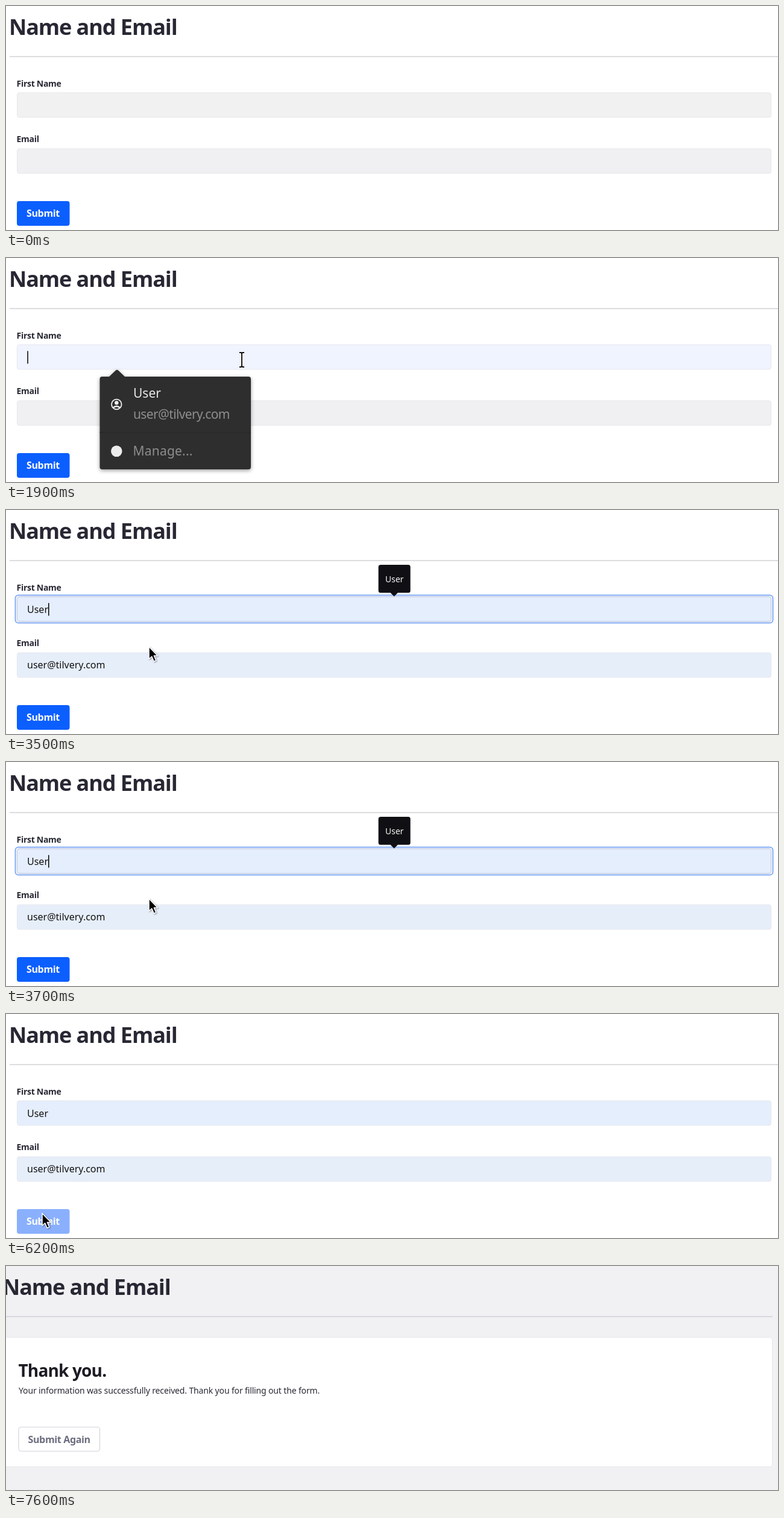
Recreate the animation shown at these times as an HTML page. Size 1280 px wide and 372 px high, loop 8.1 s.

```html
<!DOCTYPE html>
<html lang="en">
<head>
<meta charset="utf-8">
<title>Name and Email</title>
<style>
html, body { margin: 0; width: 100%; height: 100%; overflow: hidden; background: #fff; }
svg { display: block; width: 1280px; height: 372px; }
text { font-family: "Noto Sans", "Open Sans", sans-serif; fill: #272833; }

/* Type */
.title { font-size: 36px; font-weight: 700; letter-spacing: -.03em; }
.label { font-size: 14px; font-weight: 700; letter-spacing: -.02em; }
.button { font-size: 16px; font-weight: 700; letter-spacing: -.022em; }
.thanks { font-size: 28px; font-weight: 700; letter-spacing: -.03em; fill: #1c1c24; }
.info { font-size: 14px; letter-spacing: -.0105em; }
.value text { font-size: 16px; fill: #111; }
.preview text { font: 13.7px "Liberation Sans", Arial, sans-serif; fill: #000; }
.menu text { font-size: 21px; fill: #e8e8e8; }
.menu .dim { fill: #8e8e8e; letter-spacing: -.03em; }
.tip text { font-size: 14px; fill: #f4f4f4; text-anchor: middle; }

/* Shapes */
.field { stroke: #e7e7ed; }
.menu { filter: drop-shadow(0 2px 3px #0006); }
.ring { fill: none; }
.arrow, .hand { fill: #000; stroke: #fff; stroke-width: 1.5; stroke-linejoin: round; filter: drop-shadow(1px 1px 1px #0006); }
.beam { fill: none; }

/* Timeline: every change is a hard cut on one 8.1 s clock */
.name, .mail, .ring, .menu, .hover, .hover-mail, .preview, .value, .tip, .caret-start, .caret-end,
.submit, .done, .pointer, .arrow, .beam, .hand { animation: 8.1s step-end infinite; }
.name { animation-name: name; }
.mail { animation-name: mail; }
.ring { animation-name: ring; }
.menu { animation-name: menu; }
.hover { animation-name: hover; }
.menu .hover-mail { animation-name: hover-mail; }
.preview { animation-name: hover; }
.value { animation-name: value; }
.tip { animation-name: tip; }
.caret-start { animation-name: caret-start; }
.caret-end { animation-name: caret-end; }
.submit { animation-name: submit; }
.done { animation-name: done; }
.pointer { animation-name: move; }
.arrow { animation-name: arrow; }
.beam { animation-name: beam; }
.hand { animation-name: hand; }

@keyframes name { 0% { fill: #f1f1f1; } 18.51% { fill: #f0f4ff; } 30.86% { fill: #e5eefd; } }
@keyframes mail { 0% { fill: #f0f0f2; } 30.86% { fill: #e6eefa; } }
@keyframes ring { 0%, 23.45%, 71.6% { opacity: 0; } 18.51%, 29.62% { opacity: 1; } }
@keyframes menu { 0%, 41.97% { opacity: 0; } 20.98% { opacity: 1; } }
@keyframes hover { 0%, 41.97% { opacity: 0; } 30.86% { opacity: 1; } }
@keyframes hover-mail { 0% { fill: #8e8e8e; } 30.86% { fill: #e4ecf7; } }
@keyframes value { 0% { opacity: 0; } 41.97% { opacity: 1; } }
@keyframes tip { 0%, 71.6% { opacity: 0; } 43.2% { opacity: 1; } }
@keyframes caret-start { 0%, 29.62%, 41.97% { opacity: 0; } 18.51%, 35.8% { opacity: 1; } }
@keyframes caret-end { 0%, 49.38%, 65.43% { opacity: 0; } 41.97%, 56.79% { opacity: 1; } }
@keyframes submit {
  0% { fill: #0b5fff; } 60.49% { fill: #0053f0; } 72.83% { fill: #5a90ff; } 74.07% { fill: #8ab0fd; }
}
@keyframes done { 0% { opacity: 0; } 79.01% { opacity: 1; } }
@keyframes arrow {
  0%, 12.34%, 30.86%, 58.02%, 72.83% { opacity: 1; }
  11.11%, 16.04%, 56.79%, 60.49% { opacity: 0; }
}
@keyframes beam {
  0%, 12.34%, 30.86%, 58.02% { opacity: 0; }
  11.11%, 16.04%, 56.79% { opacity: 1; }
}
@keyframes hand { 0%, 72.83% { opacity: 0; } 60.49% { opacity: 1; } }
@keyframes move {
  0% { transform: translate(-60px, -60px); }
  8.64% { transform: translate(527px, 350px); }
  9.87% { transform: translate(529px, 306px); }
  11.11% { transform: translate(515px, 264px); }
  12.34% { transform: translate(497px, 230px); }
  13.58% { transform: translate(476px, 208px); }
  16.04% { transform: translate(430px, 178px); }
  17.28% { transform: translate(399px, 170px); }
  18.51% { transform: translate(391px, 169px); }
  29.62% { transform: translate(345px, 184px); }
  30.86% { transform: translate(288px, 212px); }
  32.09% { transform: translate(247px, 225px); }
  33.33% { transform: translate(237px, 227px); }
  55.55% { transform: translate(228px, 232px); }
  56.79% { transform: translate(196px, 253px); }
  58.02% { transform: translate(148px, 285px); }
  59.25% { transform: translate(110px, 311px); }
  60.49% { transform: translate(72px, 328px); }
  61.72% { transform: translate(60px, 331px); }
  81.48% { transform: translate(150px, 290px); }
  82.71% { transform: translate(420px, 190px); }
  83.95% { transform: translate(800px, 80px); }
  85.18% { transform: translate(1080px, 18px); }
  86.41% { transform: translate(-60px, -60px); }
}
</style>
</head>
<body>
<svg viewBox="0 0 1280 372" xmlns="http://www.w3.org/2000/svg">
  <rect width="1280" height="372" fill="#fff"/>
  <text class="title" x="5" y="48">Name and Email</text>
  <rect x="6" y="83.3" width="1274" height="1.4" fill="#cfcfd2"/>

  <text class="label" x="17.5" y="134">First Name</text>
  <g class="ring">
    <rect x="15.5" y="141.5" width="1256" height="46" rx="5" stroke="#84abf6" stroke-width="2"/>
  </g>
  <rect class="field name" x="18.5" y="144" width="1250" height="41" rx="3.5"/>
  <rect class="ring" x="18.5" y="144" width="1250" height="41" rx="3.5" stroke="#b9c6de"/>

  <text class="label" x="17.5" y="226">Email</text>
  <rect class="field mail" x="18.5" y="237" width="1250" height="41" rx="3.5"/>

  <g class="preview">
    <text x="36" y="171">User</text>
    <text x="35.5" y="263">user@tilvery.com</text>
  </g>
  <g class="value">
    <text x="35" y="171">User</text>
    <text x="35" y="263">user@tilvery.com</text>
  </g>
  <rect class="caret-start" x="35.3" y="154.5" width="1.5" height="21" fill="#000"/>
  <rect class="caret-end" x="70" y="154.5" width="1.5" height="21" fill="#000"/>

  <rect class="submit" x="18" y="324" width="87.5" height="41" rx="4"/>
  <text class="button" x="34" y="350" style="fill:#fff">Submit</text>

  <g class="tip">
    <path d="M621.500 91H667q3.500 0 3.500 3.500V134q0 3.500-3.500 3.500H649.500L643.500 143.500L637.500 137.500H621q-3.500 0-3.500-3.500V94.500q0-3.500 4-3.500Z" fill="#101014"/>
    <text x="644" y="119.500">User</text>
  </g>

  <g class="menu">
    <path d="M159.500 197H171L182 186.500Q184 185 186 186.500L197 197H402q4 0 4 4V347q0 4-4 4H159.500q-4 0-4-4V201q0-4 4-4Z" fill="#2e2e2e"/>
    <rect x="155.500" y="289" width="250.500" height="1.500" fill="#292929"/>
    <rect class="hover" x="155.500" y="203" width="250.500" height="80" fill="#14529c"/>
    <g fill="none" stroke="#f0f0f0" stroke-width="1.8">
      <circle cx="183.300" cy="243" r="8.300"/>
      <circle cx="183.300" cy="240.500" r="3.200" fill="#f0f0f0" stroke="none"/>
      <path d="M177.300 249q6-5.500 12 0" stroke-width="2.400"/>
    </g>
    <text x="211" y="232">User</text>
    <text class="dim hover-mail" x="211" y="267">user@tilvery.com</text>
    <circle cx="183.300" cy="320.800" r="9.300" fill="#ececec"/>
    <text class="dim" x="210.500" y="328" style="letter-spacing:.01em">Manage...</text>
  </g>

  <g class="done">
    <rect width="1280" height="372" fill="#f1f1f3"/>
    <text class="title" x="-6" y="48">Name and Email</text>
    <rect y="83.300" width="1271" height="1.400" fill="#cdced9"/>
    <rect x="-10" y="118.500" width="1280.500" height="215" rx="4" fill="#fff" stroke="#e7e7ed"/>
    <text class="thanks" x="20.500" y="184">Thank you.</text>
    <text class="info" x="21" y="212">Your information was successfully received. Thank you for filling out the form.</text>
    <rect x="21" y="267.500" width="134.500" height="40" rx="4" fill="#fff" stroke="#d3d4dc" stroke-width="1.200"/>
    <text class="button" x="36.500" y="294" style="fill:#6b6c7e">Submit Again</text>
  </g>

  <g class="pointer">
    <path class="arrow" d="M0 0V20.500L4.700 16.300L8.200 24.500L11.800 23L8.400 15H14.400Z"/>
    <g class="beam">
      <path d="M-4-12h2q2 0 2 2v20q0 2-2 2h-2M4-12h-2q-2 0-2 2M4 12h-2q-2 0-2-2" stroke="#fff" stroke-width="4"/>
      <path d="M-4-12h2q2 0 2 2v20q0 2-2 2h-2M4-12h-2q-2 0-2 2M4 12h-2q-2 0-2-2" stroke="#000" stroke-width="1.800"/>
    </g>
    <path class="hand" d="M-1 2.500Q-1 .5 1 .5T3 2.500V8q2-1.500 3.500.5 2-1 3.300.7 3.700-.7 3.700 2.800V15q0 2.500-1.500 4.500V21.500H1V19.500L-5 12.500Q-5.500 10-3 10.300L-1 12Z"/>
  </g>
</svg>
</body>
</html>
```
